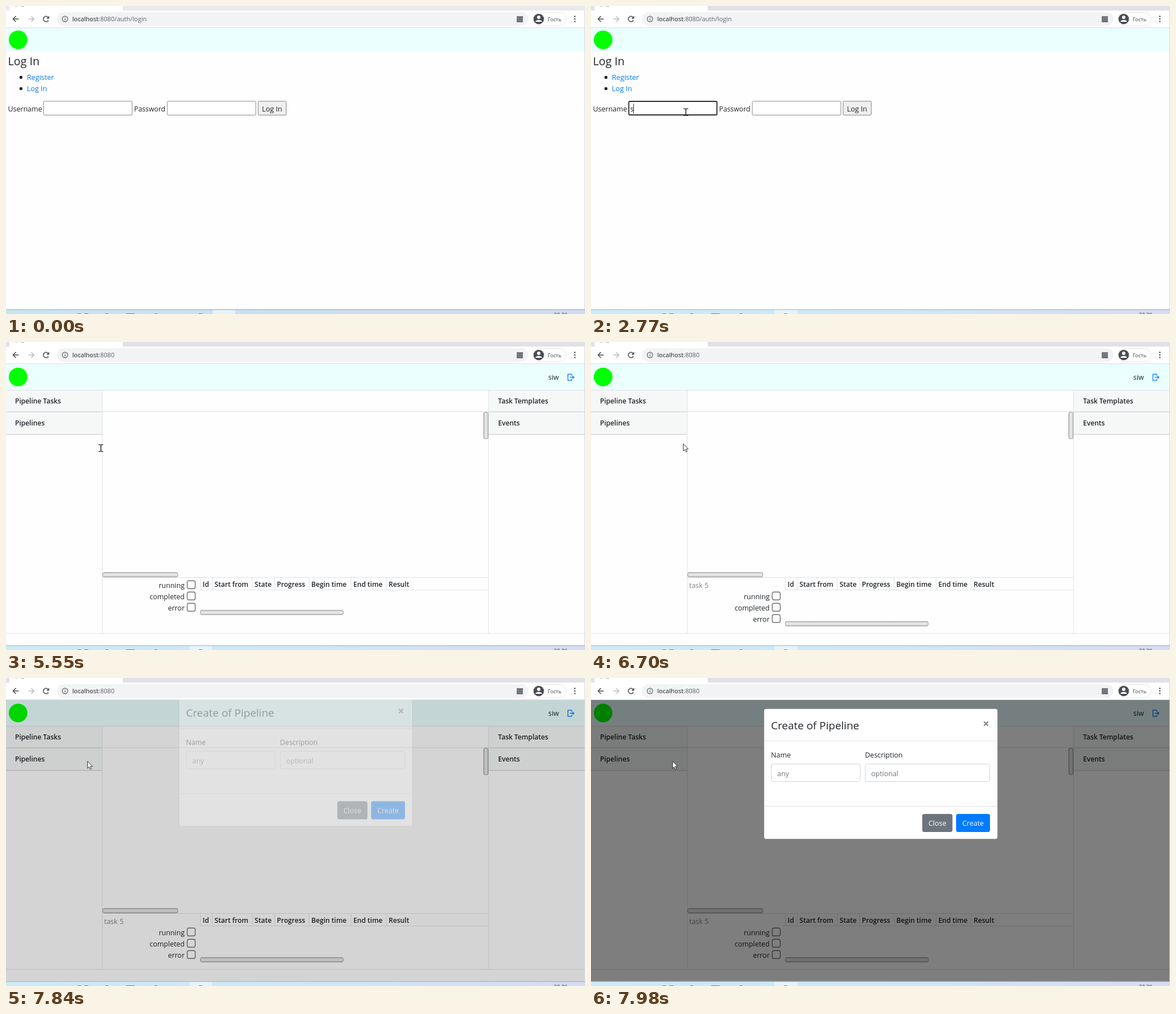
Recreate the animation shown at these times as an HTML page with a canvas. Size 1026 px wide and 546 px high, loop 8 s.

```html
<!DOCTYPE html>
<html lang="en">
<head>
<meta charset="utf-8">
<title>Pipeline editor</title>
<style>
html, body { margin: 0; width: 100%; height: 100%; overflow: hidden; background: #fefefe; }
canvas { display: block; }
</style>
</head>
<body>
<canvas id="stage" width="1026" height="546"></canvas>
<script>
const stage = document.getElementById("stage").getContext("2d");
let ctx = stage;
const LOOP = 8000;
const INK = "#212529", LINK = "#007bff", GREY = "#5f6368", RULE = "#dee2e6", PAGE = "#fefefe";
const BAR = "#ebffff", MARK = "#00ff00";
const USER = "siw";
const FOCUS = 1680, TAB = 3630, SUBMIT = 4960, LOADED = 5290, TASK = 6430, PRESS = 7570;
const NAME_KEYS = [2770, 3170, 3300];
const PASS_KEYS = [4430, 4500, 4700];

// drawing helpers
function rect(x, y, w, h, color) {
  ctx.fillStyle = color;
  ctx.fillRect(x, y, w, h);
}
function box(x, y, w, h, r, fill, stroke, width = 1) {
  const d = stroke ? width / 2 : 0;
  ctx.beginPath();
  ctx.roundRect(x + d, y + d, w - 2 * d, h - 2 * d, r);
  if (fill) { ctx.fillStyle = fill; ctx.fill(); }
  if (stroke) { ctx.strokeStyle = stroke; ctx.lineWidth = width; ctx.stroke(); }
}
function disc(x, y, r, color) {
  ctx.fillStyle = color;
  ctx.beginPath();
  ctx.arc(x, y, r, 0, Math.PI * 2);
  ctx.fill();
}
function path(points, color, width) {
  ctx.beginPath();
  for (const [x, y] of points) ctx.lineTo(x, y);
  ctx.strokeStyle = color;
  ctx.lineWidth = width;
  ctx.stroke();
}
function text(s, x, y, { size = 12.5, color = INK, weight = 400, align = "left" } = {}) {
  ctx.font = `${weight} ${size}px "Open Sans", "Noto Sans", sans-serif`;
  ctx.textAlign = align;
  ctx.fillStyle = color;
  ctx.fillText(s, x, y);
  return ctx.measureText(s).width;
}
const bold = (s, x, y) => text(s, x, y, { size: 12.1, weight: 600 });
const count = (keys, t) => keys.filter(k => k <= t).length;

// cursor: each move runs from the previous stop in n even time steps
const MOVES = [
  { from: 480, to: 690, n: 4, x: 391, y: 237, bend: 1 },
  { from: 1020, to: 1430, n: 7, x: 190, y: 173, bend: 3 },
  { from: 1760, to: 1760, n: 1, x: 192, y: 170, bend: 1 },
  { from: 1900, to: 1900, n: 1, x: 179, y: 176, bend: 1 },
  { from: 2090, to: 2490, n: 7, x: 168, y: 188, bend: 1 },
  { from: 6630, to: 7240, n: 10, x: 144, y: 147, bend: 1 }
];
function cursorAt(t) {
  let x = 1212, y = 634;
  for (const m of MOVES) {
    if (t < m.from) break;
    const gap = (m.to - m.from) / Math.max(1, m.n - 1) || 1;
    const p = Math.min(m.n, Math.floor((t - m.from) / gap + 1e-6) + 1) / m.n;
    x += (m.x - x) * p;
    y += (m.y - y) * (1 - (1 - p) ** m.bend);
  }
  return { x: Math.round(x), y: Math.round(y) };
}
function inside(p, x, y, w, h) {
  return p.x >= x && p.x < x + w && p.y >= y && p.y < y + h;
}
function drawArrow({ x, y }) {
  const shape = [[0, 0], [0, 12.5], [2.8, 10], [4.8, 14.5], [6.8, 13.6], [4.9, 9.3], [8.8, 9.1]];
  ctx.beginPath();
  for (const [dx, dy] of shape) ctx.lineTo(x + 0.5 + dx, y + 0.5 + dy);
  ctx.closePath();
  ctx.fillStyle = "#fff";
  ctx.fill();
  ctx.strokeStyle = "#222";
  ctx.lineWidth = 0.9;
  ctx.stroke();
}
function drawBeam({ x, y }) {
  rect(x - 0.5, y - 6, 1.4, 12, "#111");
  for (const dy of [-6.5, 5.5]) {
    rect(x - 4, y + dy, 3.6, 1.2, "#111");
    rect(x + 0.6, y + dy, 3.6, 1.2, "#111");
  }
}

// browser window
function drawBrowser(t) {
  rect(0, 0, 1026, 8, t >= FOCUS ? "#dee1e6" : "#e7eaed");
  box(6, -10, 201, 19, 4, "#fff");
  rect(0, 8, 1026, 30, "#fff");
  rect(17, 0, 2, 1, "#999");
  rect(27, 0, 5, 1, "#aaa");
  rect(0, 38, 1026, 1, "#dfe1e4");

  const dark = "#46494d", pale = "#bcbec0";
  for (const [x, dir, color] of [[12.5, 1, dark], [49.5, -1, pale]]) {
    path([[x, 23], [x + 10 * dir, 23]], color, 1.5);
    path([[x + 5 * dir, 18], [x, 23], [x + 5 * dir, 28]], color, 1.5);
  }
  ctx.beginPath();
  ctx.arc(71, 23, 4.7, 0.5, 5.5);
  ctx.strokeStyle = dark;
  ctx.lineWidth = 1.6;
  ctx.stroke();
  ctx.fillStyle = dark;
  ctx.beginPath();
  ctx.moveTo(76.5, 17.5);
  ctx.lineTo(76.5, 22.5);
  ctx.lineTo(71.5, 22.5);
  ctx.fill();

  box(90, 11, 836, 24, 12, "#f1f3f4");
  ctx.beginPath();
  ctx.arc(104.5, 23, 4.9, 0, Math.PI * 2);
  ctx.strokeStyle = GREY;
  ctx.lineWidth = 1.2;
  ctx.stroke();
  rect(104, 22.3, 1.2, 3.5, GREY);
  rect(104, 20, 1.2, 1.3, GREY);
  const host = text("localhost", 117.5, 27, { size: 11.1, color: "#202124" });
  text(":8080" + (t < LOADED ? "/auth/login" : ""), 117.5 + host, 27, { size: 11.1, color: GREY });
  rect(905, 18, 11, 11, "#74787c");

  box(933, 11, 60, 24, 12, "#fff", "#e6e8eb");
  disc(944, 23, 9.3, "#4b4e53");
  disc(944, 20, 3, "#fff");
  ctx.beginPath();
  ctx.ellipse(944, 28, 5.8, 3.3, 0, Math.PI, 0);
  ctx.fill();
  text("Гость", 960, 26.5, { size: 9.4, color: "#3c4043" });
  for (const y of [18.5, 23, 27.5]) disc(1008, y, 1.3, dark);
}

function blend(...colors) {
  const g = ctx.createLinearGradient(0, 0, 1026, 0);
  colors.forEach((color, i) => g.addColorStop(i / (colors.length - 1), color));
  return g;
}
function drawTaskbar(t) {
  const active = t >= FOCUS;
  rect(0, 538, 1026, 8, active ? blend("#cfeaf3", "#cfe6f4", "#d5dcf0") : blend("#c9e4ee", "#cbdfee", "#d0dbee"));
  rect(0, 537.5, 1026, 1.3, active ? blend("#7fd0e8", "#8cc9ee", "#a3b0e4") : blend("#96bdd0", "#96b4d2", "#a4b2d2"));
  rect(active ? 325 : 366, 539, 40, 7, "#e6f4fa");
  for (const [x, w] of [[127, 6], [139, 7], [176, 5], [213, 15], [263, 5], [342, 6]]) {
    rect(x, 545, w, 1, "#71838f");
  }
  text("23:36", 971, 550.5, { size: 9.4, color: "#222" });
}

// sign-in page
function field(x, hover, focused) {
  const color = focused ? "#111" : hover ? "#404040" : "#8a8a8a";
  box(x, 168.3, 157.8, 25.6, 1.5, "#fff", color, focused ? 1.6 : 1);
}
function drawLogin(t, cursor) {
  rect(0, 39, 1025, 42, BAR);
  disc(21.5, 60, 16.5, MARK);
  text("Log In", 3.5, 105, { size: 19.8, weight: 500 });
  ["Register", "Log In"].forEach((label, i) => {
    disc(26.5, 126.5 + i * 20, 2.7, INK);
    text(label, 37, 131 + i * 20, { size: 12.7, color: LINK });
  });
  const onName = t >= FOCUS && t < TAB, onPass = t >= TAB;
  text("Username", 3.5, 187);
  field(66.2, inside(cursor, 66, 168, 158, 26), onName);
  text("Password", 227, 187, { size: 12.3 });
  field(285.4, inside(cursor, 286, 168, 158, 26), onPass);
  box(446.4, 168.3, 50.6, 25.6, 1.5, "#efefef", "#858585");
  text("Log In", 471.5, 187, { size: 12.7, align: "center" });

  const typed = text(USER.slice(0, count(NAME_KEYS, t)), 69.5, 187);
  const dots = count(PASS_KEYS, t);
  for (let i = 0; i < dots; i++) disc(292 + i * 5.3, 182.5, 2.1, "#111");

  if (t >= FOCUS) {
    const now = Math.min(t, SUBMIT);
    const last = Math.max(...[FOCUS, TAB, ...NAME_KEYS, ...PASS_KEYS].filter(k => k <= now));
    if (Math.floor((now - last) / 530) % 2 === 0) {
      rect(onName ? Math.round(69.5 + typed) : Math.round(289 + dots * 5.3), 173, 1, 18, "#333");
    }
  }
}

// editor page
function thumb(x, y, w, h) {
  const flat = w > h;
  const g = flat ? ctx.createLinearGradient(0, y, 0, y + h) : ctx.createLinearGradient(x, 0, x + w, 0);
  g.addColorStop(0, "#c2c2c2");
  g.addColorStop(0.5, "#ededed");
  g.addColorStop(1, "#c2c2c2");
  box(x, y, w, h, 2.5, g, "#a0a0a0");
}
function panelHead(label, x, y, w, h) {
  rect(x, y, w, h, "#f6f8f8");
  rect(x, y + h - 1, w, 1.5, "#d6d8d9");
  bold(label, x + 16 + (x ? 1 : 0), y + 23);
}
function addIcon(x, y, color) {
  path([[x + 6, y + 13], [x + 1, y + 13], [x + 1, y + 4.5], [x + 4, y + 1], [x + 10.5, y + 1], [x + 10.5, y + 6]], color, 1.5);
  path([[x + 1, y + 4.7], [x + 4.3, y + 4.7], [x + 4.3, y + 1]], color, 1.2);
  rect(x + 6, y + 9, 8, 2.4, color);
  rect(x + 8.8, y + 6.2, 2.4, 8, color);
}
function exitIcon(x, y) {
  path([[x + 7.5, y + 3], [x + 7.5, y + 0.7], [x + 0.7, y + 0.7], [x + 0.7, y + 11.3], [x + 7.5, y + 11.3], [x + 7.5, y + 9]], LINK, 1.3);
  path([[x + 4, y + 6], [x + 11, y + 6]], LINK, 1.3);
  path([[x + 8.8, y + 3.5], [x + 11.3, y + 6], [x + 8.8, y + 8.5]], LINK, 1.3);
}
function drawEditor(t, cursor, covered) {
  rect(0, 39, 1025, 46, BAR);
  disc(21.5, 62, 16.5, MARK);
  text(USER, 961, 67);
  exitIcon(995, 56.5);
  rect(0, 85, 1025, 1, RULE);

  panelHead("Pipeline Tasks", 0, 86, 170, 38);
  panelHead("Pipelines", 0, 125, 170, 39);
  panelHead("Task Templates", 855, 86, 170, 38);
  panelHead("Events", 855, 125, 170, 39);
  rect(170, 85, 1, 432, RULE);
  rect(854.5, 85, 1, 432, RULE);
  rect(171, 123, 684, 1, RULE);
  thumb(846, 124, 9, 48);
  thumb(171, 408, 134, 9);
  rect(171, 417, 684, 1, RULE);

  const drop = t >= TASK ? 20 : 0;
  if (drop) text("task 5", 174, 436, { color: "#7d8389" });
  ["running", "completed", "error"].forEach((label, i) => {
    const y = 436 + drop + i * 20;
    text(label, 316.5, y, { align: "right" });
    box(320.5, y - 13.5, 15.5, 15.5, 3, "#fff", "#707070", 1.4);
  });

  const columns = { "Id": 344, "Start from": 365, "State": 436, "Progress": 475.5, "Begin time": 536.5, "End time": 611, "Result": 673.5 };
  for (const [label, x] of Object.entries(columns)) {
    rect(x, 418, 1, 22, RULE);
    bold(label, x + 4.5, 434);
  }
  rect(344, 439, 511, 1, RULE);
  thumb(344, 475 + drop, 254, 9);
  rect(0, 516, 1025, 1, RULE);

  if (!covered && inside(cursor, 0, 124, 170, 39)) {
    addIcon(137, 137, inside(cursor, 136, 136, 16, 18) ? "#0056b3" : LINK);
    if (t >= PRESS && t < 7770) box(134, 137, 20, 20, 3, null, "rgba(0,123,255,.35)");
  }
}

// dialog
const FADE = [
  { at: 7840, shade: 0.165, alpha: 0.33, dy: -22.5 },
  { at: 7910, shade: 0.39, alpha: 0.79, dy: -10 },
  { at: 7980, shade: 0.5, alpha: 1, dy: 0 }
];
function paintDialog() {
  box(306, 54, 415, 232, 4, "#fff", "rgba(0,0,0,.2)");
  text("Create of Pipeline", 319, 91, { size: 19, weight: 500 });
  path([[696.3, 77.3], [703.7, 84.7]], "#7c7c7c", 2);
  path([[703.7, 77.3], [696.3, 84.7]], "#7c7c7c", 2);
  rect(307, 111, 413, 1, RULE);
  text("Name", 319, 141);
  text("Description", 485.5, 141);
  box(319, 152, 158.5, 32, 3.5, "#fff", "#ced4da");
  box(485.5, 152, 221.5, 32, 3.5, "#fff", "#ced4da");
  text("any", 330, 173.5, { color: "#6c757d" });
  text("optional", 496.5, 173.5, { color: "#6c757d" });
  rect(307, 227, 413, 1, RULE);
  box(587, 241, 53.5, 32, 3.5, "#6c757d");
  box(647, 241, 60, 32, 3.5, LINK);
  text("Close", 613.7, 262, { color: "#fff", align: "center" });
  text("Create", 677, 262, { color: "#fff", align: "center" });
}
// painted on its own canvas, so that it fades as one layer
const dialog = document.createElement("canvas");
dialog.width = 1026;
dialog.height = 546;
ctx = dialog.getContext("2d");
paintDialog();
ctx = stage;

function drawDialog({ shade, alpha, dy }) {
  rect(0, 39, 1025, 499, `rgba(0,0,0,${shade})`);
  ctx.save();
  ctx.beginPath();
  ctx.rect(0, 39, 1025, 499);
  ctx.clip();
  ctx.globalAlpha = alpha;
  ctx.drawImage(dialog, 0, dy);
  ctx.restore();
}

function draw(t) {
  const cursor = cursorAt(t);
  const fade = FADE.filter(f => f.at <= t).pop();
  rect(0, 0, 1026, 546, PAGE);
  drawBrowser(t);
  if (t < LOADED) drawLogin(t, cursor);
  else drawEditor(t, cursor, !!fade);
  if (fade) drawDialog(fade);
  rect(1025, 8, 1, 530, "#d3d9de");
  drawTaskbar(t);

  if (t < MOVES[0].from) return;
  const overField = inside(cursor, 66, 168, 158, 26) || inside(cursor, 286, 168, 158, 26);
  const beam = t < SUBMIT ? overField : t >= 5550 && t < 6630;
  (beam ? drawBeam : drawArrow)(cursor);
}

function tick() {
  draw(performance.now() % LOOP);
  requestAnimationFrame(tick);
}
tick();
</script>
</body>
</html>
```
